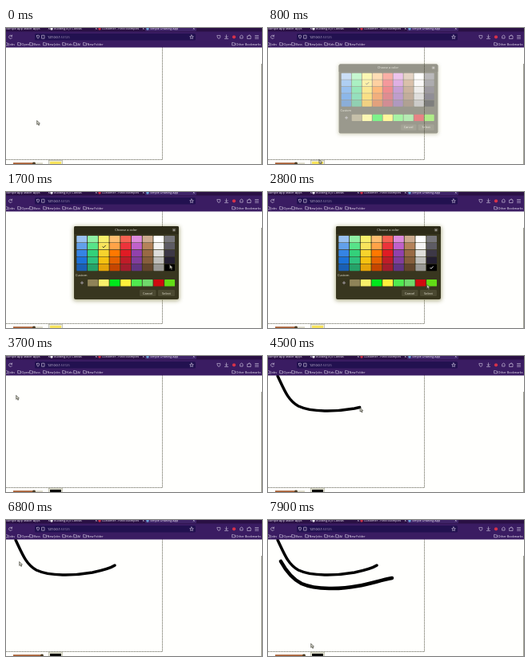
Write an HTML page that moves like this. It is 320 by 171 pixels and loops after 8 s.

```html
<!DOCTYPE html>
<html lang="en">
<head>
<meta charset="utf-8">
<title>Drawing app</title>
<style>
html, body { margin: 0; width: 100%; height: 100%; overflow: hidden; background: #fff; }
svg { display: block; width: 100vw; height: 100vh; }
text { font: 4px "Open Sans", sans-serif; fill: #f4effa; }
.ink, .line { fill: none; stroke-linecap: round; stroke-linejoin: round; }
.ink { stroke: #000; }
.line { stroke: #d8d0e6; stroke-width: .6; }
#chrome text { font-size: 3.75px; }
#dialog { transform-origin: 150px 89px; }
#dialog text { fill: #e9e7d6; }
</style>
</head>
<body>
<svg viewBox="0 0 320 171" preserveAspectRatio="none">
  <defs>
    <filter id="soft" x="-20%" y="-20%" width="140%" height="140%"><feGaussianBlur stdDeviation="2.5"/></filter>
  </defs>
  <rect width="320" height="171" fill="#fffffd"/>

  <path d="M195.5 24V165.5H0" fill="none" stroke="#77776a" stroke-width="1" stroke-dasharray="1.2 .8"/>
  <path d="M319.5 45V171" stroke="#9b9b8e" stroke-width="1"/>
  <path id="ink1" class="ink" stroke-width="3.5" d="M12 25C20 42 25 56 38 63C55 71 85 70 108 66C122 63 130 61 136 57"/>
  <path id="ink2" class="ink" stroke-width="4.6" d="M16 52C22 63 30 74 42 80C60 88 92 87 112 83C128 80 140 76 155 73"/>

  <rect x="9" y="169.4" width="37" height="1.6" fill="#d9d6c4"/>
  <rect id="fill" x="9" y="169.4" width="26" height="1.6" fill="#a5572b"/>
  <circle id="thumb" cy="170.3" r="1.9" fill="#4a3a22"/>
  <rect x="53.5" y="166.5" width="17" height="6" fill="#eeeedc" stroke="#a5a592" stroke-width=".6"/>
  <rect id="well" x="55" y="168" width="14" height="4"/>

  <g id="chrome">
    <rect width="320" height="24.5" fill="#3a1c62"/>
    <rect width="320" height="4.5" fill="#2a1044"/>
    <rect x="174" y="-2" width="64" height="6" rx="1" fill="#3f2468"/>
    <rect x="36" y="7" width="201" height="8.6" rx="1.5" fill="#221150"/>
    <g class="line">
      <path d="M7.3 10A2.1 2.1 0 1 0 7.5 12.3M7.6 8.9V10.4H6"/>
      <path d="M38.5 9.7L40 9L41.5 9.7Q41.5 12.5 40 13.3Q38.500 12.5 38.5 9.7Z"/>
      <path d="M45 9.2H48V13.2H45Z"/>
      <path d="M232 8.9L232.7 10.5L234.3 10.7L233.1 11.9L233.4 13.5L232 12.7L230.6 13.5L230.9 11.9L229.700 10.7L231.3 10.5Z"/>
      <path d="M264.2 9.400H267.800V11.300Q267.500 13.200 266 13.400Q264.500 13.200 264.200 11.300Z"/>
      <path d="M275.500 8.800V12M274 10.700L275.500 12.200L277 10.700M273.500 13.500H277.500"/>
      <path d="M293 10L294.500 9L296 10V13H293Z"/>
      <path d="M302 10H303.500V9H305V10H306V13.500H302Z"/>
      <path d="M311.500 9.500H315.500M311.500 11.400H315.500M311.500 13.300H315.500"/>
    </g>
    <circle cx="285" cy="11.3" r="2.1" fill="#d8324a"/>
    <circle cx="57" cy="1" r="1.7" fill="#e9e5ef"/>
    <circle cx="117" cy="1" r="1.7" fill="#cf3148"/>
    <circle cx="177" cy="1" r="1.7" fill="#6ca6d8"/>
    <text x="52" y="12.8">127.0.0.1<tspan fill="#a69abd">:53125</tspan></text>
  </g>

  <g id="dialog">
    <rect x="84" y="43" width="133" height="94" rx="3" fill="#6c6928" opacity=".5" filter="url(#soft)"/>
    <rect x="85" y="43" width="131" height="92" rx="2" fill="#38361f"/>
    <path d="M85 53V45Q85 43 87 43H214Q216 43 216 45V53Z" fill="#2d2b18"/>
    <text x="150" y="49.3" text-anchor="middle" font-weight="600">Choose a color</text>
    <circle cx="210" cy="47.8" r="2.4" fill="#55533d"/>
    <path class="line" d="M209.2 47L210.8 48.6M210.8 47L209.2 48.6"/>
    <g id="swatches"></g>
    <text x="87" y="106">Custom</text>
    <path class="line" d="M93.3 114.2H96.7M95 112.5V115.9"/>
    <rect x="167" y="123" width="20.5" height="8" rx="1.3" fill="#4b4931"/>
    <rect x="190" y="123" width="21" height="8" rx="1.3" fill="#4b4931"/>
    <text x="177.2" y="128.6" text-anchor="middle">Cancel</text>
    <text x="200.5" y="128.6" text-anchor="middle">Select</text>
    <path id="tick" d="M-2 0L-.6 1.4L2.2-1.5" fill="none" stroke-width=".9"/>
  </g>

  <path id="cursor" d="M.7 .4V5.4L1.9 4.400L2.800 6.400L3.700 6L2.800 4.100H4.400Z" fill="#d8d8cc" stroke="#44443a" stroke-width=".7"/>
</svg>
<script>
const $ = id => document.getElementById(id);
const LOOP = 8000, STEP = 100;

function add(parent, tag, attrs, text = '') {
  const el = document.createElementNS('http://www.w3.org/2000/svg', tag);
  for (const key in attrs) el.setAttribute(key, attrs[key]);
  el.textContent = text;
  parent.append(el);
  return el;
}

const tabs = [[0, 'Sample App Maker Apps'], [60, 'Building a JS Canvas'], [120, 'Customer - Field Examples'], [180, 'Simple Drawing App']];
tabs.forEach(([x, label]) => add($('chrome'), 'text', { x, y: 2.2 }, label));
[53, 112, 171, 234].forEach(x => add($('chrome'), 'path', { class: 'line', d: `M${x} 0l1.5 1.5m0-1.5l-1.5 1.5` }));

const bookmarks = [[-1, 'Jobs'], [15, 'Open'], [30, 'Buss'], [47, 'New Jobs'], [71, 'Kids'], [85, 'AI'], [97, 'New Folder'], [283, 'Other Bookmarks']];
for (const [x, label] of bookmarks) {
  add($('chrome'), 'path', { class: 'line', d: `M${x} 18.4h1.2l.6.6h1.7v2.8h-3.5z` });
  add($('chrome'), 'text', { x: x + 4.6, y: 21.5 }, label);
}

const palette = [
  '99c1f1 62a0ea 3584e4 1c71d8 1a5fb4', '8ff0a4 57e389 33d17a 2ec27e 26a269',
  'f9f06b f8e45c f6d32d f5c211 e5a50a', 'ffbe6f ffa348 ff7800 e66100 c64600',
  'f66151 ed333b e01b24 c01c28 a51d2d', 'dc8add c061cb 9141ac 813d9c 613583',
  'cdab8f b5835a 986a44 865e3c 63452c', 'ffffff f6f5f4 deddda c0bfbc 9a9996',
  '77767b 5e5c64 3d3846 241f31 000000'
];
const custom = '8f8358 f9f06b 00e81c fff03c 50ea50 70d86c d00a10 62dd16';
const cell = (col, y, height, fill) =>
  add($('swatches'), 'rect', { x: 88.3 + col * 13.73, y, width: 12.9, height, rx: .7, fill: '#' + fill });
palette.forEach((shades, col) => shades.split(' ').forEach((c, row) => cell(col, 55 + row * 8.95, 8.4, c)));
custom.split(' ').forEach((c, i) => cell(i + 1, 110, 8.6, c));

// time, x, y
const moves = [
  [0, 38, 116], [200, 39, 122], [700, 63, 165], [1000, 64, 165], [1700, 204, 91],
  [2400, 204, 92], [2800, 198, 116], [3000, 199, 126], [3200, 199, 126],
  [3700, 12, 49], [3900, 12, 25], [4700, 136, 57], [4800, 136, 57], [5500, 36, 167],
  [5800, 34, 168], [6400, 44, 168], [6500, 44, 168], [6800, 16, 52], [7400, 155, 73], [7900, 53, 155]
];
const strokes = [[$('ink1'), 3900, 4700], [$('ink2'), 6800, 7400]].map(([path, from, to]) =>
  ({ path, from, to, length: path.getTotalLength() }));

const clamp = v => Math.max(0, Math.min(1, v));
const part = (t, from, to) => clamp((t - from) / (to - from));
const ease = k => k * k * (3 - 2 * k);

function pointer(t) {
  const pen = strokes.find(s => t >= s.from && t <= s.to);
  if (pen) {
    const p = pen.path.getPointAtLength(pen.length * ease(part(t, pen.from, pen.to)));
    return [p.x, p.y];
  }
  const i = moves.findIndex(m => m[0] > t);
  if (i < 0) return moves.at(-1).slice(1);
  const a = moves[i - 1], b = moves[i], k = ease(part(t, a[0], b[0]));
  return [a[1] + (b[1] - a[1]) * k, a[2] + (b[2] - a[2]) * k];
}

function draw(t) {
  const black = t >= 2000;
  const shown = t < 2000 ? part(t, 700, 900) : 1 - part(t, 3100, 3300);
  $('dialog').style.opacity = shown;
  $('dialog').style.transform = `scale(${.89 + .11 * shown})`;
  $('tick').setAttribute('transform', black ? 'translate(204.5 95)' : 'translate(122.5 68.5)');
  $('tick').setAttribute('stroke', black ? '#fff' : '#222');
  $('well').setAttribute('fill', t >= 3200 ? '#000' : '#f8e45c');

  const thumb = 35 + 10 * ease(part(t, 5800, 6400));
  $('thumb').setAttribute('cx', thumb);
  $('fill').setAttribute('width', thumb - 9);

  for (const { path, from, to, length } of strokes) {
    path.style.visibility = t > from ? 'visible' : 'hidden';
    path.style.strokeDasharray = `${length * ease(part(t, from, to))} ${length + 9}`;
  }
  $('cursor').setAttribute('transform', `translate(${pointer(t)})`);
}

const start = performance.now();
function tick() {
  const t = (performance.now() - start) % LOOP;
  draw(Math.floor(t / STEP) * STEP);
  requestAnimationFrame(tick);
}
tick();
</script>
</body>
</html>
```
